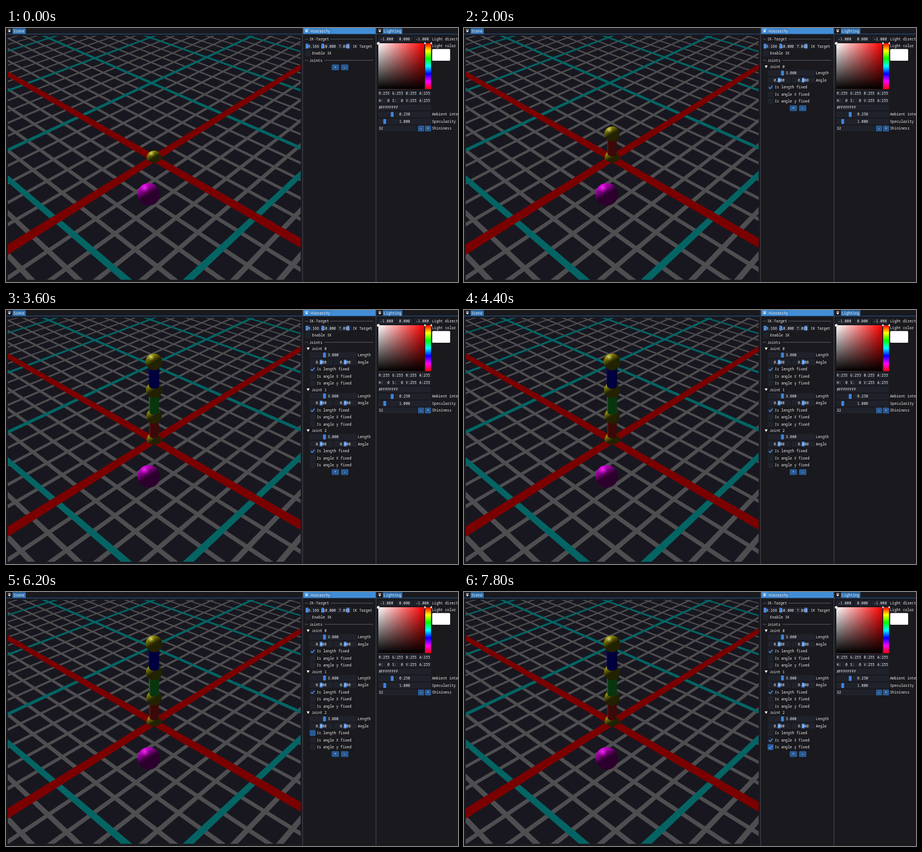
Animation of 800 by 450 pixels, one loop 8 s. Source, as an HTML page:

```html
<!DOCTYPE html>
<html lang="en">
<head>
<meta charset="utf-8">
<title>Inverse kinematics editor</title>
<style>
  html, body { margin: 0; width: 100%; height: 100%; overflow: hidden; background: #19191e; }
  svg { display: block; }
  text { font: 6.4px "Noto Sans Mono", "DejaVu Sans Mono", monospace; fill: #f0f0f0; white-space: pre; }
</style>
</head>
<body>
<svg id="stage" width="800" height="450" viewBox="0 0 800 450">
  <defs>
    <clipPath id="view"><rect x="3" y="14" width="518.5" height="432"/></clipPath>
    <clipPath id="dome"><path d="M249 230A13 13 0 0 1 275 230A13 8.2 0 0 1 249 230Z"/></clipPath>
    <linearGradient id="toRed"><stop stop-color="#fff"/><stop offset="1" stop-color="#f00"/></linearGradient>
    <linearGradient id="toBlack" x2="0" y2="1">
      <stop stop-color="#000" stop-opacity="0"/><stop offset="1" stop-color="#000"/>
    </linearGradient>
    <linearGradient id="hue" x2="0" y2="1"></linearGradient>
  </defs>
</svg>
<script>
const LOOP = 8000;
const BLUE = '#3d85e0', BUTTON = '#295a93', FIELD = '#20222b', PANEL = '#19191e';
const stage = document.getElementById('stage');
const defs = stage.querySelector('defs');

function add(parent, tag, attrs = {}, content) {
  const node = document.createElementNS('http://www.w3.org/2000/svg', tag);
  for (const key in attrs) node.setAttribute(key, attrs[key]);
  if (content !== undefined) node.textContent = content;
  parent.appendChild(node);
  return node;
}
const show = (node, visible) => node.setAttribute('visibility', visible ? 'inherit' : 'hidden');
const rect = (parent, x, y, width, height, fill, rx = 0) =>
  add(parent, 'rect', { x, y, width, height, fill, rx });
const label = (parent, x, mid, content, anchor = 'start') =>
  add(parent, 'text', { x, y: mid + 2.3, 'text-anchor': anchor }, content);

// ---- Scene: camera looks at the world origin, z is up ----
const CX = 262, CY = 230, FOCAL = 720, DIST = 42.9, SIN = 0.6, COS = 0.8;
const AXIS_A = [0.7207, -0.6933], AXIS_B = [0.6933, 0.7207];
const CELL = 2.49;

function project(a, b) {
  const right = a * AXIS_A[0] + b * AXIS_B[0];
  const ahead = a * AXIS_A[1] + b * AXIS_B[1];
  const scale = FOCAL / (DIST + ahead * COS);
  return [CX + right * scale, CY + 0.8 - ahead * SIN * scale].map(v => v.toFixed(2)).join();
}

const scene = add(stage, 'g', { 'clip-path': 'url(#view)' });
rect(scene, 3, 14, 519, 432, '#18171f');

function gridLines(wanted, width, fill) {
  for (let k = -10; k <= 22; k++) {
    if (!wanted(k)) continue;
    const lo = k * CELL - width / 2, hi = lo + width;
    add(scene, 'polygon', { fill, points: [project(-90, lo), project(28, lo), project(28, hi), project(-90, hi)].join(' ') });
    add(scene, 'polygon', { fill, points: [project(-lo, -28), project(-lo, 90), project(-hi, 90), project(-hi, -28)].join(' ') });
  }
}
gridLines(k => k % 5 !== 0, 0.42, '#4e4e50');
gridLines(k => k % 5 === 0 && k !== 0, 0.58, '#046464');
gridLines(k => k === 0, 0.98, '#7b0000');

const tint = (color, k) => `rgb(${color.map(c => Math.min(255, Math.round(c * k))).join()})`;

// Light comes from the upper left, so diffuse shading is linear across a ball.
function ballPaint(name, color, shine, strength) {
  const diffuse = add(defs, 'linearGradient', { id: name, x1: 0.5, y1: 0.5, x2: 0.245, y2: 0.07 });
  add(diffuse, 'stop', { 'stop-color': tint(color, 0.25) });
  add(diffuse, 'stop', { offset: 1, 'stop-color': tint(color, 1.2) });
  const spot = add(defs, 'radialGradient', { id: name + 'Spot', cx: 0.32, cy: 0.2, r: 0.22 });
  [[0, strength], [0.4, strength * 0.45], [1, 0]].forEach(([offset, alpha]) =>
    add(spot, 'stop', { offset, 'stop-color': shine, 'stop-opacity': alpha }));
}
ballPaint('yellow', [136, 132, 4], '#ffff9c', 0.75);
ballPaint('magenta', [176, 0, 180], '#ff30ff', 0.9);

function ball(parent, name, cx, cy, r) {
  for (const paint of [name, name + 'Spot']) add(parent, 'circle', { cx, cy, r, fill: `url(#${paint})` });
}

const heightScale = k => 1 / (1 - 0.0417 * k);
const heightY = k => CY - 40.25 * k * heightScale(k);

function limb(parent, k, name, color) {
  const paint = add(defs, 'linearGradient', { id: name });
  add(paint, 'stop', { 'stop-color': tint(color, 0.62) });
  add(paint, 'stop', { offset: 0.16, 'stop-color': tint(color, 0.25) });
  const low = 8.4 * heightScale(k), high = 8.4 * heightScale(k + 1);
  const y = heightY(k) - 7.5 * heightScale(k), top = heightY(k + 1);
  add(parent, 'path', {
    fill: `url(#${name})`,
    d: `M${CX - high} ${top}L${CX - low} ${y}A${low} ${low * SIN} 0 0 0 ${CX + low} ${y}L${CX + high} ${top}Z`
  });
  ball(parent, 'yellow', CX, top, 13 * heightScale(k + 1));
}

ball(add(scene, 'g', { 'clip-path': 'url(#dome)' }), 'yellow', CX, CY, 13);
ball(scene, 'magenta', 252.7, 294.8, 20);
const limbs = [['red', [236, 36, 28]], ['green', [32, 210, 56]], ['blue', [0, 0, 244]]].map(([name, color], k) => {
  const group = add(scene, 'g');
  limb(group, k, name, color);
  return group;
});

// ---- Interface ----
const ui = add(stage, 'g');

function titleBar(x, width, title, tabWidth, focused) {
  if (focused) rect(ui, x, 0, width, 10.5, '#428ed6');
  rect(ui, x + 11.5, 0.5, tabWidth, 10, focused ? '#3c84ca' : '#3273b4', 1);
  rect(ui, x, 10.3, width, 0.9, '#2c619c');
  rect(ui, x + 3.5, 2.3, 5, 0.9, '#fff');
  add(ui, 'path', { d: `M${x + 3.3} 4.4h5.4l-2.7 3.6z`, fill: '#fff' });
  label(ui, x + 13.3, 5.7, title);
}
titleBar(0, 524.5, 'Scene', 23.5, false);
titleBar(526, 128.5, 'Hierarchy', 38.5, true);
titleBar(655.5, 144.5, 'Lighting', 34.5, false);
rect(ui, 524.4, 0, 1, 450, '#4b4b57');
rect(ui, 654.4, 0, 1, 450, '#4b4b57');

function field(parent, x, mid, width, content, grab) {
  rect(parent, x, mid - 5.2, width, 10.4, FIELD, 1);
  if (grab !== undefined) rect(parent, grab, mid - 4.4, 5, 8.8, BLUE, 1.2);
  label(parent, x + width / 2, mid, content, 'middle');
}

function button(parent, x, mid, width, sign) {
  const face = rect(parent, x, mid - 5.2, width, 10.4, BUTTON, 1.5);
  label(parent, x + width / 2, mid, sign, 'middle');
  return face;
}

function checkbox(parent, x, mid, content) {
  const box = rect(parent, x, mid - 5.2, 10.4, 10.4, FIELD, 1);
  const mark = add(parent, 'path', {
    d: `M${x + 2} ${mid + 0.2}l2.4 2.4l4.2 -4.9`, fill: 'none', stroke: '#4296fa', 'stroke-width': 1.6
  });
  label(parent, x + 12.4, mid, content);
  return (checked, hovered) => {
    show(mark, checked);
    box.setAttribute('fill', hovered ? BUTTON : FIELD);
  };
}

function separator(mid, content, lineX) {
  rect(ui, 529, mid - 0.5, 6, 1, '#5c5c68');
  rect(ui, lineX, mid - 0.5, 649.5 - lineX, 1, '#5c5c68');
  label(ui, 537, mid, content);
}

separator(19.8, 'IK-Target', 574);
field(ui, 529.3, 32.2, 26.4, '-9.166', 530.3);
field(ui, 557.3, 32.2, 26.4, '-10.000', 558);
field(ui, 585.3, 32.2, 26.4, '7.083', 602.7);
label(ui, 613.7, 32.2, 'IK Target');
checkbox(ui, 529.3, 44.7, 'Enable IK')(false, false);
separator(57.2, 'Joints', 563.5);

const ROW = 72.5;
const joints = [0, 1, 2].map(n => {
  const group = add(ui, 'g', { transform: `translate(0 ${n * ROW})` });
  add(group, 'path', { d: 'M532.2 66.6h5.2l-2.6 4.3z', fill: '#fff' });
  label(group, 540.7, 68.7, 'Joint ' + n);
  field(group, 537.3, 79.8, 83.5, '3.000', 561.2);
  label(group, 622.7, 79.8, 'Length');
  field(group, 537.3, 92.3, 41, '0.000', 555.3);
  field(group, 580, 92.3, 41, '0.000', 597.8);
  label(group, 622.7, 92.3, 'Angle');
  const checks = ['length', 'angle X', 'angle y'].map((what, i) =>
    checkbox(group, 537.5, 104.8 + i * 12.45, `Is ${what} fixed`));
  return { group, checks };
});

const buttons = add(ui, 'g');
const plus = button(buttons, 576.5, 69.6, 13, '+');
button(buttons, 593, 69.6, 13, '-');

['-1.000', '0.000', '-1.000'].forEach((value, i) => field(ui, 658.7 + i * 31.5, 19.8, 30.2, value));
label(ui, 754, 19.8, 'Light direction');
label(ui, 754, 31.2, 'Light color');
rect(ui, 754.3, 37.3, 31.8, 20.8, '#fff', 1.5);

['#f00', '#ff0', '#0f0', '#0ff', '#00f', '#f0f', '#f00'].forEach((color, i) =>
  add(document.getElementById('hue'), 'stop', { offset: i / 6, 'stop-color': color }));
rect(ui, 659, 27, 81.3, 81.3, 'url(#toRed)');
rect(ui, 659, 27, 81.3, 81.3, 'url(#toBlack)');
rect(ui, 742, 27, 10.3, 81.3, 'url(#hue)');
add(ui, 'circle', { cx: 659, cy: 27.3, r: 2.5, fill: '#fff', stroke: '#777', 'stroke-width': 0.5 });
add(ui, 'path', { d: 'M740.5 24.7l3.2 2.4l-3.2 2.4zM753.8 24.7l-3.2 2.4l3.2 2.4z', fill: '#fff' });

[['R:255', 'G:255', 'B:255', 'A:255'], ['H:  0', 'S:  0', 'V:255', 'A:255']].forEach((row, j) =>
  row.forEach((value, i) => {
    const x = 658.7 + i * 23.9, mid = 115.8 + j * 12.4;
    rect(ui, x, mid - 5.2, 22, 10.4, FIELD, 1);
    label(ui, x + 1, mid, value);
  }));
rect(ui, 658.7, 135.4, 93.7, 10.4, FIELD, 1);
label(ui, 659.7, 140.6, '#FFFFFFFF');
field(ui, 658.7, 153.1, 93.7, '0.250', 681);
field(ui, 658.7, 165.6, 93.7, '1.000', 667.8);
rect(ui, 658.7, 172.8, 68.6, 10.4, FIELD, 1);
label(ui, 659.7, 178, '32');
button(ui, 729, 178, 11, '-');
button(ui, 741.4, 178, 11, '+');
label(ui, 754, 153.1, 'Ambient intensity');
label(ui, 754, 165.6, 'Specularity');
label(ui, 754, 178, 'Shininess');

// ---- Timeline ----
const JOINT_AT = [2000, 2800, 3600];
const during = (t, from, to) => t >= from && t < to;

function render(t) {
  const count = JOINT_AT.filter(at => t >= at).length;
  joints.forEach(({ group, checks }, n) => {
    show(group, n < count);
    show(limbs[n], n < count);
    const last = n === 2;
    checks[0](!last || t < 6200, last && during(t, 5200, 6400));
    checks[1](last && t >= 6800, last && during(t, 6600, 7200));
    checks[2](last && t >= 7600, last && t >= 7400);
  });
  buttons.setAttribute('transform', `translate(0 ${count * ROW})`);
  const hovered = JOINT_AT.some(at => during(t, at - 400, at));
  plus.setAttribute('fill', hovered ? '#4296fa' : BUTTON);
}

const start = performance.now();
function tick() {
  render((performance.now() - start) % LOOP);
  requestAnimationFrame(tick);
}
render(0);
requestAnimationFrame(tick);
</script>
</body>
</html>
```
